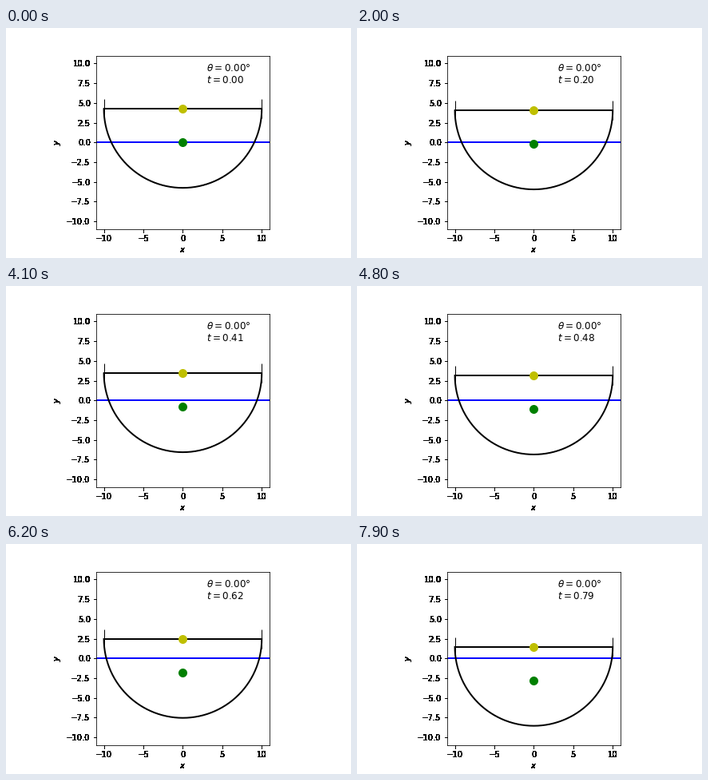
Write a matplotlib script that moves like this. It is 432x288 px and loops after 8000 ms.

```python
import numpy as np
import matplotlib.pyplot as plt
from matplotlib.animation import FuncAnimation

RADIUS = 10
CENTROID = 4 * RADIUS / (3 * np.pi)
GRAVITY = 9.8
STIFFNESS = 1.8
FRAMES = 80
DT = 0.01


def sink(t):
    """Depth reached under gravity and a linear restoring force."""
    return GRAVITY / STIFFNESS * (1 - np.cos(np.sqrt(STIFFNESS) * t))


def solid(image, dpi):
    """Turn soft edges into hard black ones."""
    out = np.zeros_like(image)
    out[..., 3] = image[..., 3] > 0.04
    return out, 0, 0


fig = plt.figure(figsize=(6, 4), dpi=72, facecolor="white")
fig.subplots_adjust(left=0.125, right=0.9, bottom=0.125, top=0.88)
ax = fig.add_subplot(aspect="equal", xlim=(-11, 11), ylim=(-11, 11))
ax.set_xticks(np.arange(-10, 11, 5))
ax.set_yticks(np.arange(-10, 10.1, 2.5))
ax.set_xlabel("$x$")
ax.set_ylabel("$y$")
for axis in (ax.xaxis, ax.yaxis):
    axis.set_agg_filter(solid)

phi = np.linspace(np.pi, 2 * np.pi, 181)
arc_x, arc_y = RADIUS * np.cos(phi), RADIUS * np.sin(phi)

ax.plot([-11, 11], [0, 0], "b-", lw=2)
hull, = ax.plot([], [], "k-", lw=2)
deck, = ax.plot([], [], "k|-", lw=2, ms=24, mew=1)
center, = ax.plot([], [], "yo", ms=10)
mass, = ax.plot([], [], "go", ms=10)
angle_text = ax.text(3, 9, "", fontsize=12)
time_text = ax.text(3, 7.5, "", fontsize=12)


def update(i):
    t = i * DT
    y = -sink(t)
    top = y + CENTROID
    hull.set_data(arc_x, arc_y + top)
    deck.set_data([-RADIUS, RADIUS], [top, top])
    center.set_data([0], [top])
    mass.set_data([0], [y])
    angle_text.set_text(rf"$\theta = {0:.2f}$°")
    time_text.set_text(f"$t = {t:.2f}$")
    return hull, deck, center, mass, angle_text, time_text


anim = FuncAnimation(fig, update, frames=FRAMES, interval=100,
                     repeat=True, repeat_delay=0, blit=False)
plt.show()
```
